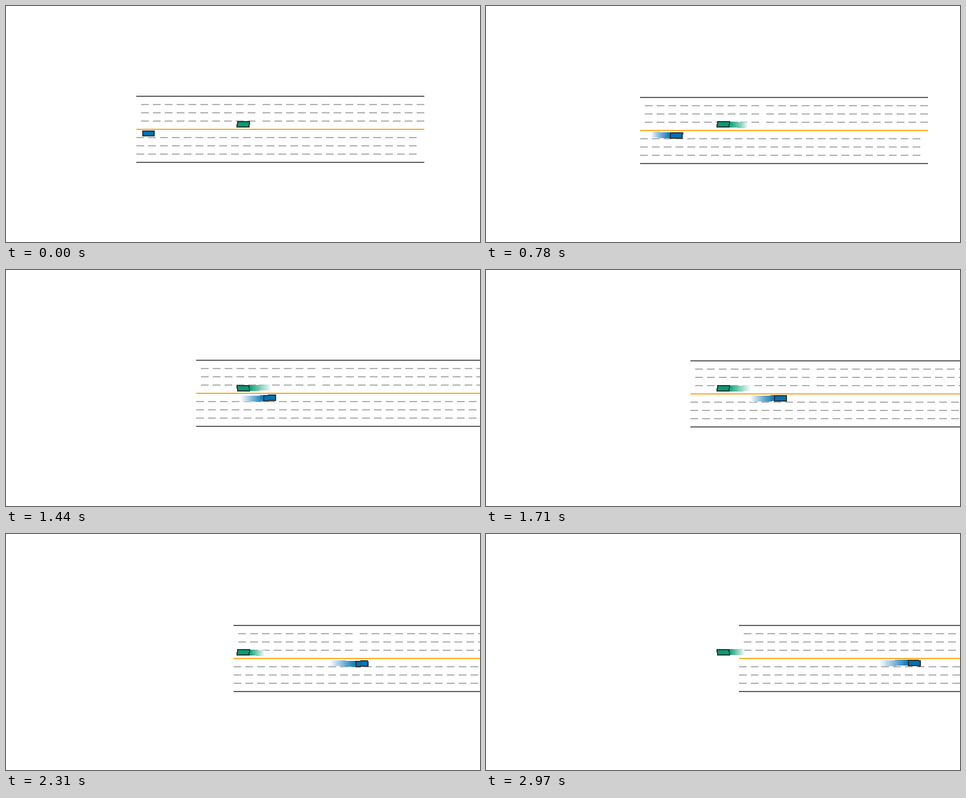
Animation, 800 px wide and 400 px high, one loop 3 s. Source, as a matplotlib script:

```python
import numpy as np
import matplotlib.pyplot as plt
from matplotlib.animation import FuncAnimation
from matplotlib.collections import PolyCollection
from matplotlib.transforms import Affine2D

W, H, DPI = 800, 400, 100
FRAMES, STEP_MS = 100, 30
TRAIL = 13          # past poses shown behind each car
WAVE = 128          # length in pixels of the steering wave
ROAD_X, ROAD_Y, ROAD_LEN, LANE = 220, 152, 486, 14
GREEN = np.array([0, 158, 115]) / 255
BLUE = np.array([0, 114, 178]) / 255
OUTLINE = np.full(3, 51) / 255
EDGE, DASH, CENTRE = "#606060", "#afafaf", "#ffa826"


def distance(n, *ramps):
    """Pixels driven after n steps; each ramp (start, end, dv) changes the speed."""
    return sum(dv * (max(n - a, 0) ** 2 - max(n - b, 0) ** 2) / (2 * (b - a))
               for a, b, dv in ramps)


def weave(s, base, amp, trough, drift=0):
    """Sideways position and slope after driving s pixels."""
    k = 2 * np.pi / WAVE
    phase = k * (s - trough)
    return base - amp * np.cos(phase) + drift * s, amp * k * np.sin(phase) + drift


def ego(n):
    s = distance(n, (0, 21.5, 2.78), (54, 55, -0.825))
    return s, *weave(s, 0.78, 1, 110, 0.004)


def other(n):
    s = distance(n, (0, 20.7, 2.82), (45, 52, 0.38), (70, 80, 0.44))
    return s, *weave(s, 217.2, 0.8, 0)


# The camera stays on the ego car, so poses are shifted by its motion.
def ego_pose(n, then):
    x, y, _ = ego(n)
    px, py, slope = ego(then)
    return 400.5 + x - px, 200.5 + y - py, slope


def other_pose(n, then):
    x, y, _ = ego(n)
    px, py, slope = other(then)
    return 240.5 + x + px, py + np.round(y), slope


def box(pose, w, h):
    cx, cy, slope = pose
    tilt = np.arctan(slope)
    c, s = np.cos(tilt), np.sin(tilt)
    corners = np.array([(-w, -h), (w, -h), (w, h), (-w, h)]) / 2
    return corners @ np.array([(c, s), (-s, c)]) + (cx, cy)


def bar(x, lane, w):
    y = lane * LANE
    return [(x, y), (x + w, y), (x + w, y + 2), (x, y + 2)]


def add_shapes(shapes, color, **kw):
    coll = PolyCollection(shapes, facecolors=color, edgecolors="none",
                          antialiaseds=False, **kw)
    ax.add_collection(coll, autolim=False)
    return coll


fig = plt.figure(figsize=(W / DPI, H / DPI), dpi=DPI, facecolor="white")
ax = fig.add_axes([0, 0, 1, 1])
ax.set_xlim(0, W)
ax.set_ylim(H, 0)
ax.axis("off")

# Road in its own coordinates, moved as a whole by `shift`.
shift = Affine2D()
upper = [*range(8, 189, 20), *range(213, 474, 20)]
lower = range(0, 461, 20)
dashes = [bar(x, lane, 13)
          for lanes, xs in (((1, 2, 3), upper), ((5, 6, 7), lower))
          for lane in lanes for x in xs]
for bars, color in ((dashes, DASH),
                    ([bar(0, lane, ROAD_LEN) for lane in (0, 8)], EDGE),
                    ([bar(0, 4, ROAD_LEN)], CENTRE)):
    add_shapes(bars, color, transform=shift + ax.transData, zorder=1)
traffic = add_shapes([], "none", zorder=2)


def draw(k):
    n = max(k - 1, 0)
    x, y, _ = ego(n)
    shift.clear().translate(ROAD_X + np.round(x), ROAD_Y + np.round(y))
    shapes, colors = [], []
    for pose, color in ((ego_pose, GREEN), (other_pose, BLUE)):
        for past in range(min(TRAIL, n), 0, -1):
            fade = past / (TRAIL + 1)
            shapes.append(box(pose(n, n - past), 20, 9))
            colors.append(color * (1 - fade) + fade)
        now = pose(n, n)
        shapes += [box(now, 21, 10), box(now, 17, 6)]
        colors += [OUTLINE, color]
    traffic.set_verts(shapes)
    traffic.set_facecolor(colors)
    return []


anim = FuncAnimation(fig, draw, frames=FRAMES, interval=STEP_MS, repeat=True,
                     repeat_delay=0, blit=False)
plt.show()
```
